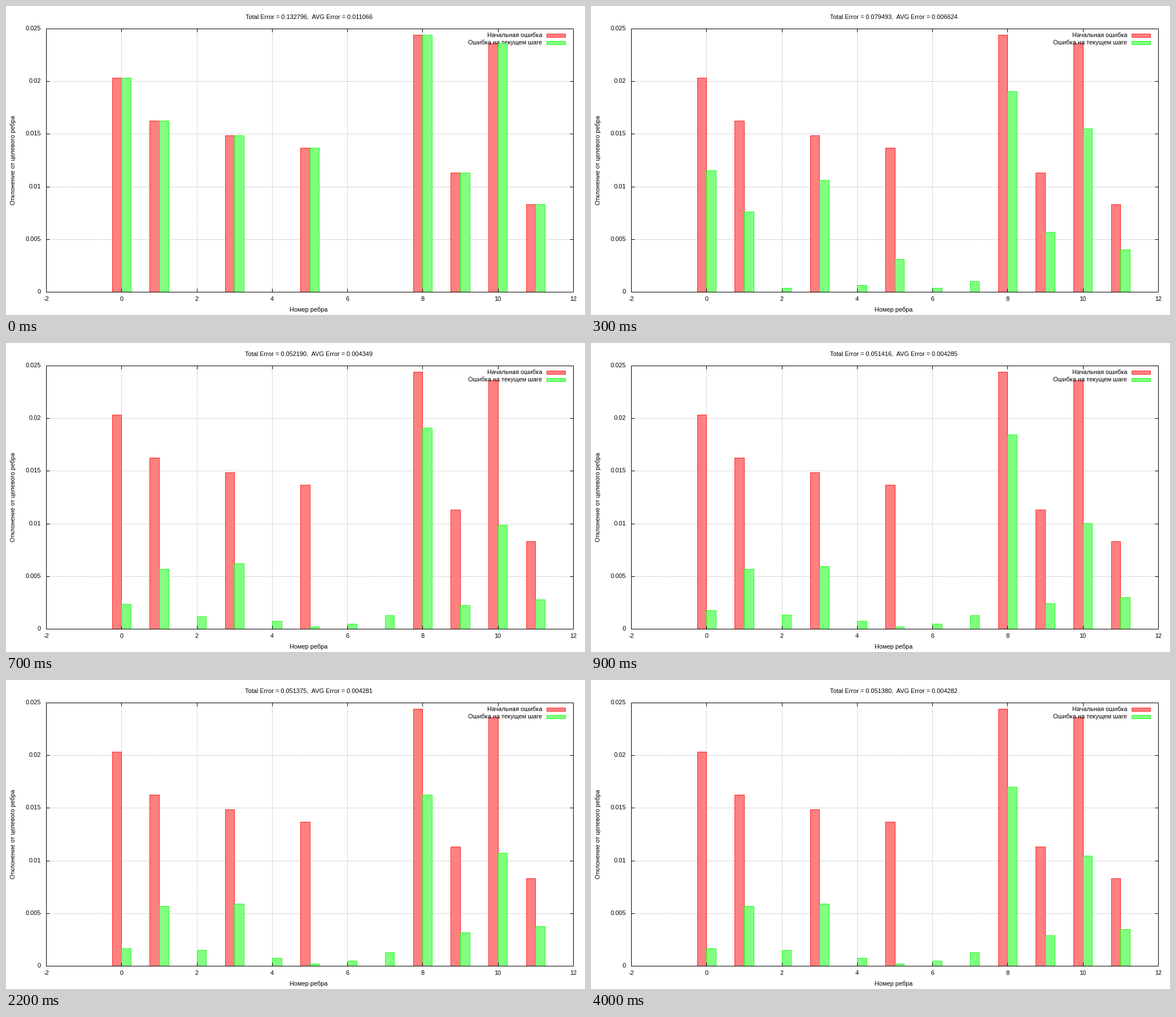
A matplotlib script for the animation above (5 s loop, 1025 by 547 pixels).

```python
import numpy as np
import matplotlib.pyplot as plt
from matplotlib.animation import FuncAnimation
from matplotlib.patches import Rectangle

W, H, DPI = 1025, 547, 100
PX = 72 / DPI  # one pixel in points
FRAME_MS, LOOP_MS = 100, 5000

plt.rcParams["font.family"] = "Liberation Sans"
plt.rcParams["font.size"] = 11 * PX

RED = dict(ec="#ff0000", fc="#ff8080")
GREEN = dict(ec="#00ff00", fc="#80ff80")

# The optimiser publishes quickly at first, then more and more rarely.
STEP_MS = [0, 100, *range(300, 1101, 100), *range(1300, 2201, 300),
           3500, 3600, 3800, 4000]

# Each edge: first error, resting error (both in 1e-5), settling pace in steps.
EDGES = [
    (2035, 168, 2.7), (1624, 571, 1.4), (0, 150, 4.5), (1485, 591, 2.7),
    (0, 73, 1.3), (1370, 21, 1.5), (0, 48, 1.5), (0, 128, 1.5),
    (2443, 1625, 1.9), (1130, 315, 1.8), (2363, 1074, 2.0), (829.6, 374.1, 1.0),
]
start, rest, pace = np.array(EDGES).T


def errors_at(step):
    """Every edge relaxes to rest, while edge 8 trades error with 9 to 11."""
    err = rest + (start - rest) * np.exp(-(step / pace) ** 1.5)
    trade = np.interp(STEP_MS[step], [300, 700, 1300, 2200, 3500, 4000],
                      [0, 280, 95, 0, 0, 77])
    err[8] += trade
    err[9:] -= trade / 3
    return err * 1e-5


def px(x):
    return 71 + (x + 2) * 933 / 14


def py(v):
    return 506 - v / 0.025 * 466


fig = plt.figure(figsize=(W / DPI, H / DPI), dpi=DPI, facecolor="white")
ax = fig.add_axes([0, 0, 1, 1])
ax.set_xlim(0, W)
ax.set_ylim(H, 0)
ax.axis("off")


def line(x0, y0, x1, y1, **style):
    style = {"color": "black", "lw": PX, "solid_capstyle": "butt", "zorder": 6, **style}
    ax.plot([x0, x1], [y0, y1], **style)


def label(x, y, s, ha="center", z=6):
    return ax.text(x, y, s, ha=ha, va="baseline", color="black", zorder=z)


def box(x0, y0, x1, y1, z, lw=0.8 * PX, **colors):
    return ax.add_patch(Rectangle((x0, y0), x1 - x0, y1 - y0, lw=lw, zorder=z, **colors))


left, right, top, bottom = px(-2), px(12), py(0.025), py(0)
grid = dict(zorder=0, color="#909090", ls=(0, (1, 2)), dash_capstyle="butt")

for x in range(-2, 13, 2):
    c = px(x)
    if -2 < x < 12:
        line(c, bottom, c, 72 if x == 10 else top, **grid)  # stops below the key
        line(c, bottom, c, bottom - 6)
        line(c, top, c, top + 6)
    label(c, 522, str(x))

for i in range(6):
    v = i * 0.005
    r = py(v)
    if 0 < i < 5:
        line(left, r, right, r, **grid)
        line(left, r, left + 6, r)
        line(right, r, right - 6, r)
    label(62, r + 3, f"{v:g}", ha="right")

box(left, top, right, bottom, 6, lw=PX, ec="black", fc="none")

label(535.5, 541, "Номер ребра")
ax.text(17.6, 272.5, "Отклонение от целевого ребра", rotation=90,
        ha="right", va="center", color="black")
title = label(536, 22.5, "")

label(949, 55, "Начальная ошибка", ha="right", z=1)
box(957, 49, 990, 55, 2, **RED)
label(949, 68, "Ошибка на текущем шаге", ha="right", z=3)
box(957, 62, 990, 68, 4, **GREEN)

for edge, err in enumerate(start * 1e-5):
    if err > 0:
        box(px(edge - 0.25), py(err), px(edge), bottom, 2, **RED)

bars = [box(px(e), bottom, px(e + 0.25), bottom, 4, **GREEN) for e in range(len(EDGES))]


def draw(frame):
    step = int(np.searchsorted(STEP_MS, frame * FRAME_MS, side="right")) - 1
    errors = errors_at(step)
    for bar, err in zip(bars, errors):
        bar.set_y(py(err))
        bar.set_height(bottom - py(err))
        bar.set_visible(bool(err > 0))
    title.set_text(f"Total Error = {errors.sum():.6f},  AVG Error = {errors.mean():.6f}")
    return [*bars, title]


anim = FuncAnimation(fig, draw, frames=LOOP_MS // FRAME_MS, interval=FRAME_MS,
                     init_func=lambda: draw(0), repeat=True, repeat_delay=0)
plt.show()
```
